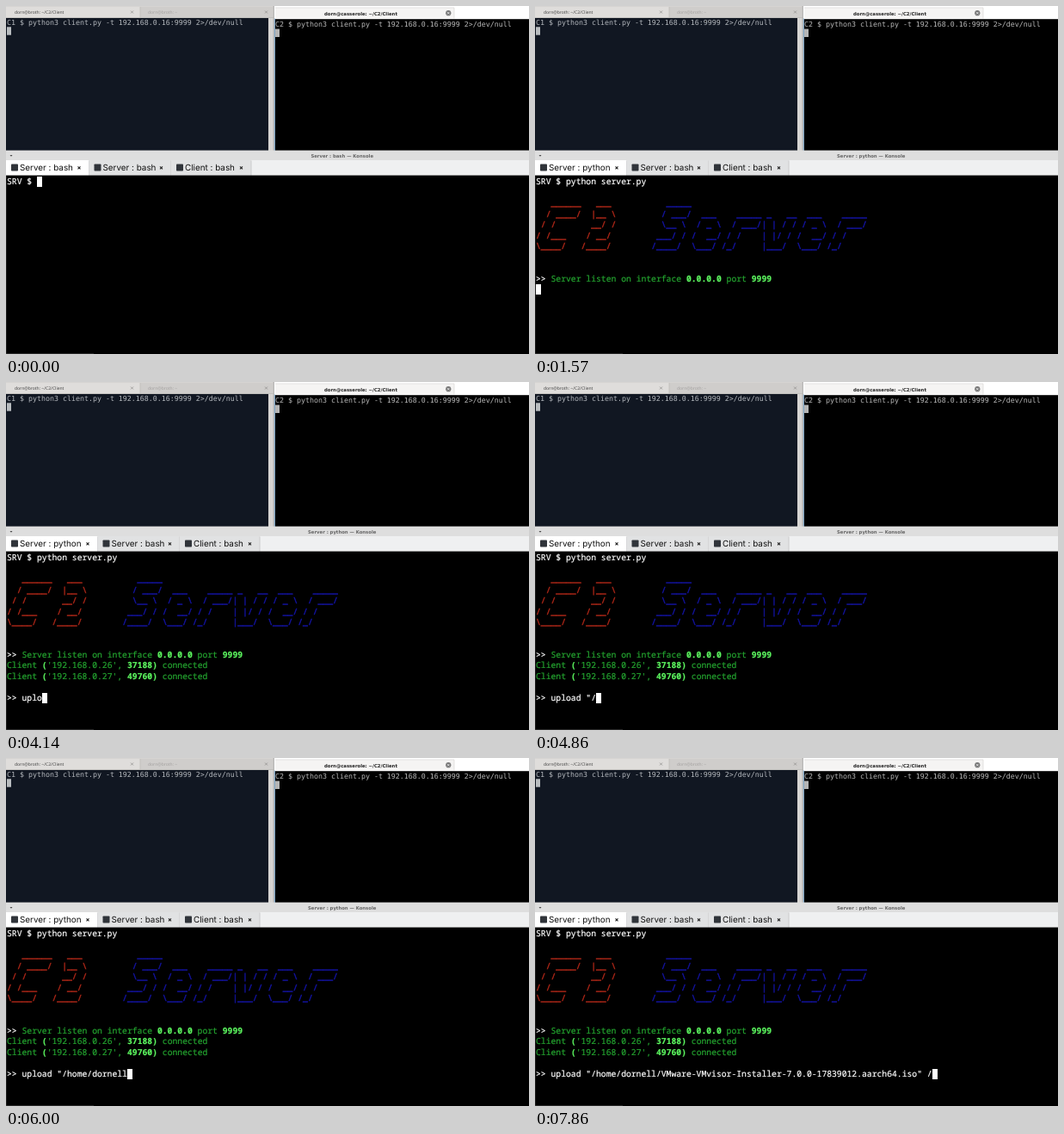
Recreate the animation shown at these times as an HTML page. Size 608 by 404 pixels, loop 8000 ms.

```html
<!DOCTYPE html>
<html lang="en">
<head>
<meta charset="utf-8">
<title>Terminal session</title>
<style>
  html, body { margin: 0; width: 100%; height: 100%; overflow: hidden; background: #000; }
  #stage { position: relative; width: 608px; height: 404px; overflow: hidden; }
  svg { position: absolute; inset: 0; }
  text, pre { white-space: pre; text-rendering: geometricPrecision; }
  .shell { font: 8.31px "DejaVu Sans Mono", monospace; }
  .small { font: 5px "Noto Sans", sans-serif; }
  .title { font: bold 5.32px "DejaVu Sans", sans-serif; text-anchor: middle; }
  .label { font: 9.9px Inter, sans-serif; fill: #111; }
  .close { stroke: #222; stroke-width: 1.1; }
  #console {
    position: absolute; left: 1px; top: 198px; margin: 0;
    font: 9.72px/12.5px "Noto Sans Mono", monospace; color: #fff;
    -webkit-text-stroke: .2px;
  }
  .red, .blue { -webkit-text-stroke: .4px; }
  .red { color: #b22818; }
  .blue { color: #1414a8; }
  .green { color: #24a630; }
  #console b { color: #5cf55f; }
  .cursor { display: inline-block; width: 6px; height: 12px; vertical-align: top; background: #fff; }
</style>
</head>
<body>
<div id="stage">
  <svg width="608" height="404" viewBox="0 0 608 404">
    <!-- left terminal -->
    <rect width="312" height="168" fill="#d6d4d2"/>
    <rect y="1" width="156" height="12.5" fill="#dfdddb"/>
    <rect x="156" y="1" width="154" height="12.5" fill="#cfcdcb"/>
    <path d="M156 1V13.5M0 13.5H311" stroke="#bbb9b7" stroke-width=".7"/>
    <text class="small" x="10" y="8.8" fill="#444">dorn@broth: ~/C2/Client</text>
    <text class="small" x="165" y="8.8" fill="#a3a1a0">dorn@broth: ~</text>
    <path d="M145 5.5l3 3m0-3l-3 3M301 5.5l3 3m0-3l-3 3" stroke="#8a8887" stroke-width=".7"/>
    <rect y="14" width="305" height="154" fill="#111722"/>
    <rect x="310.5" width="1.5" height="168" fill="#b8b7b6"/>
    <text class="shell" x="1" y="22" fill="#b4b8bd">C1 $ python3 client.py -t 192.168.0.16:9999 2&gt;/dev/null</text>
    <rect x="1" y="24.3" width="5" height="9.4" fill="#b9bdc0"/>
    <!-- right terminal -->
    <rect x="312" width="296" height="168" fill="#fff"/>
    <rect x="313" y="2" width="208" height="12.5" fill="#f5f4f3"/>
    <path d="M521 2V14.5M313 2H521" stroke="#d8d6d4" stroke-width=".7"/>
    <text class="title" x="412.5" y="10.6" fill="#222">dorn@casserole: ~/C2/Client</text>
    <circle cx="514.3" cy="8.2" r="3.1" fill="#777"/>
    <path d="M513 6.9l2.6 2.6m0-2.6l-2.6 2.6" stroke="#fff" stroke-width=".7"/>
    <rect x="312" y="15.2" width="296" height="152.8" fill="#000"/>
    <path d="M312.4 14.5V168" stroke="#8fb9dc" stroke-width="1"/>
    <text class="shell" x="313" y="24.3" fill="#b8b8b8">C2 $ python3 client.py -t 192.168.0.16:9999 2&gt;/dev/null</text>
    <rect x="313" y="26.6" width="5" height="9.4" fill="#b5b5b5"/>
    <!-- server window -->
    <rect y="167.6" width="608" height="11.4" fill="#dedede"/>
    <path d="M4.5 173h3l-1.5 1.7z" fill="#444"/>
    <text id="title" class="title" x="390.7" y="176" fill="#666"></text>
    <rect y="179" width="608" height="18" fill="#eff0f1"/>
    <g id="tabs"></g>
    <rect y="196.6" width="608" height="207.4" fill="#000"/>
    <path d="M.2 197V404M0 403.6H102" stroke="#4a4a4a" stroke-width=".6"/>
  </svg>
  <pre id="console"></pre>
</div>
<script>
const LOOP = 8000;
const $ = id => document.getElementById(id);

const rows = art => art.split('\n').slice(1, 6);
const C2 = rows(String.raw`
   ______   ___
  / ____/  |__ \
 / /       __/ /
/ /___    / __/
\____/   /____/
`);
const SERVER = rows(String.raw`
   _____
  / ___/  ___    _____ _   __  ___    _____
  \__ \  / _ \  / ___/| | / / / _ \  / ___/
 ___/ / /  __/ / /    | |/ / /  __/ / /
/____/  \___/ /_/     |___/  \___/ /_/
`);
const span = (name, text) => `<span class="${name}">${text}</span>`;
const BANNER = C2.map((row, i) =>
  span('red', row.padEnd(23)) + span('blue', SERVER[i]));

const client = (ip, port) =>
  span('green', `Client <b>(</b>'${ip}', <b>${port})</b> connected`);
const LISTEN = '&gt;&gt; ' + span('green',
  'Server listen on interface <b>0.0.0.0</b> port <b>9999</b>');

const START = 'python server.py';
const UPLOAD = 'upload "/home/dornell/VMware-VMvisor-Installer-7.0.0-17839012.aarch64.iso" /';

// [time in ms, characters visible from then on]
const START_KEYS = [[140, 2], [280, 6], [430, 10], [570, 16]];
const UPLOAD_KEYS = [
  [3570, 1], [3710, 2], [3860, 3], [4140, 4], [4280, 5], [4430, 6],
  [4710, 8], [4860, 9], [5000, 10], [5140, 12], [5290, 13], [5430, 15],
  [5570, 16], [5710, 18], [5860, 19], [6000, 21], [6290, 22], [6430, 23],
  [6570, 24], [6710, 25], [6860, 47], [7000, 53], [7140, 73],
  [7570, 74], [7710, 75], [7860, 76]
];
const typed = (text, keys, t) =>
  text.slice(0, keys.reduce((n, [at, count]) => t >= at ? count : n, 0));

function consoleText(t) {
  const lines = ['SRV $ ' + typed(START, START_KEYS, t)];
  if (t >= 1570) lines.push('', ...BANNER, '', '', LISTEN);
  if (t >= 1860) lines.push(client('192.168.0.26', 37188));
  if (t >= 2140) lines.push(client('192.168.0.27', 49760));
  if (t >= 2710) lines.push('', '&gt;&gt; ' + typed(UPLOAD, UPLOAD_KEYS, t));
  else if (t >= 1140) lines.push('');
  return lines.join('\n') + span('cursor', '');
}

function tab(x, width, name, active) {
  const cross = x + width - 11.5;
  return `<rect x="${x}" y="179" width="${width}" height="18" fill="${active ? '#fff' : '#e1e2e3'}"/>
    <path d="M${x + width} 179.5V197" stroke="#c4c5c6" stroke-width=".8"/>
    <rect x="${x + 6}" y="183.5" width="8" height="8" rx=".8" fill="#30343a"/>
    <text class="label" x="${x + 16}" y="191.3">${name}</text>
    <path class="close" d="M${cross - 1.5} 186.3l3 3m0-3l-3 3"/>`;
}

function drawWindow(program) {
  const first = program === 'python' ? 106.5 : 96.5;
  $('title').textContent = `Server : ${program} — Konsole`;
  $('tabs').innerHTML = tab(0, first, 'Server : ' + program, true)
    + tab(first, 95.5, 'Server : bash') + tab(first + 95.5, 93, 'Client : bash');
}

let shownText, shownProgram;
function render(now) {
  const t = now % LOOP;
  const program = t < 1290 ? 'bash' : 'python';
  const text = consoleText(t);
  if (program !== shownProgram) drawWindow(shownProgram = program);
  if (text !== shownText) $('console').innerHTML = shownText = text;
}

const begin = performance.now();
function tick() {
  render(performance.now() - begin);
  requestAnimationFrame(tick);
}
tick();
</script>
</body>
</html>
```
